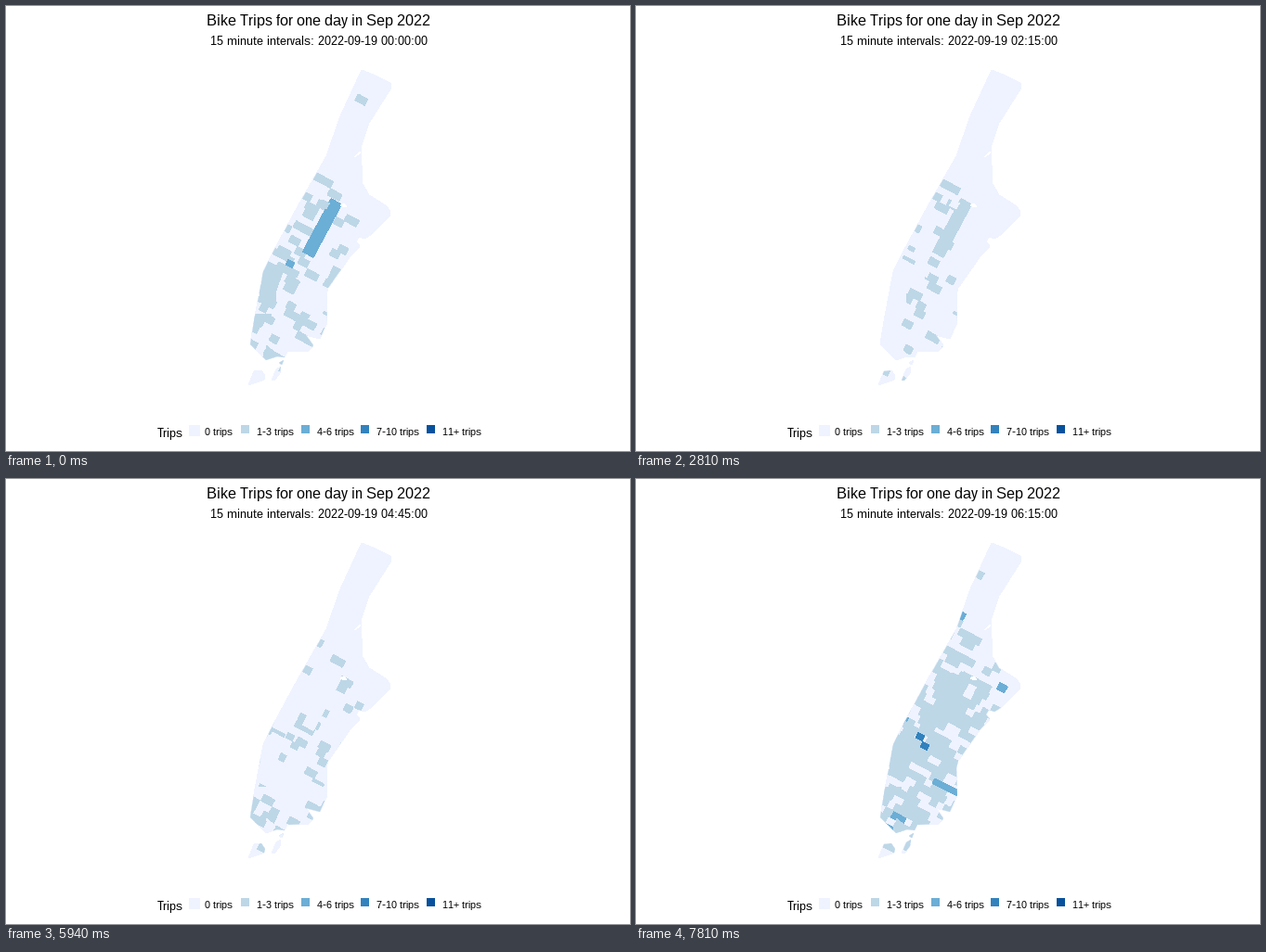
A matplotlib script that plays this animation: 672 by 480 pixels, repeating every 8 s.

```python
import random
from math import exp

import matplotlib.pyplot as plt
import numpy as np
from matplotlib.animation import FuncAnimation
from matplotlib.collections import PolyCollection
from matplotlib.path import Path

W, H, DPI = 672, 480, 100
INTERVAL, LOOP, STEP_MS, STEPS = 20, 8000, 312.5, 26
COLORS = ["#EFF3FF", "#BDD7E7", "#6BAED6", "#3182BD", "#08519C"]
THRESHOLDS = [1, 4, 7, 11]          # fewest trips for each darker colour

CENTER = np.array([340.5, 239.5])
ACROSS = np.array([0.882, 0.471])   # along a street
ALONG = np.array([0.471, -0.882])   # up an avenue

# Whole-pixel glyph spacing
plt.rcParams.update({"text.hinting": "native", "text.hinting_factor": 1,
                     "text.kerning_factor": 6})


def shape(*xy):
    return np.reshape(xy, (-1, 2)).astype(float)


def block(x, y, w, h):
    corners = [(-1, -1), (1, -1), (1, 1), (-1, 1)]
    return np.array([(x, y) + a * w / 2 * ACROSS + b * h / 2 * ALONG for a, b in corners])


ISLAND = shape(
    274, 376, 263, 365, 267, 340, 277, 287, 284, 272, 312, 220, 345, 162, 360, 119,
    383, 69, 400, 76, 414, 83, 415, 88, 391, 126, 382, 153, 384, 192, 391, 204, 410, 216,
    414, 222, 413, 227, 391, 248, 386, 251, 380, 249, 377, 254, 381, 259, 370, 271,
    347, 304, 345, 312, 346, 341, 338, 359, 323, 355, 331, 366, 326, 372, 303, 373,
    300, 379, 292, 378, 280, 382)
ISLET = shape(294, 385, 299, 382, 297, 387)
LAND = [ISLAND, ISLET, shape(291, 392, 296, 389, 295, 396, 289, 404, 286, 404),
        shape(267, 394, 275, 393, 279, 399, 278, 403, 261, 409)]
INLETS = [shape(360, 215, 363, 213, 367, 216, 365, 217),
          shape(375, 163, 382, 157, 382, 158)]

# Landmark tracts: outline, trips at midnight, trips in the morning
LANDMARKS = [
    (block(*CENTER, 13, 65), 4.5, 2),
    (shape(281, 275, 299, 284, 290, 309, 291, 320, 272, 320, 277, 287), 3.5, 1.1),
    (shape(268, 332, 286, 332, 286, 339, 267, 340), 2, 1.2),
    (shape(280, 366, 290, 374, 289, 377, 283, 375), 3.9, 1.5),
    (shape(322, 323, 346, 335, 346, 342, 319, 328), 0, 5),
    (block(297, 269, 27, 6), 3.9, 3),
    (block(343, 214, 8, 7), 3.9, 3),
    (block(306, 278, 8, 6), 4.2, 7.2),
    (block(311, 288, 8, 6), 3.9, 8.6),
    (ISLET, 3.9, 1.5),
]


def street_grid(rng):
    """Rows of tracts of uneven width, each with how busy its area is."""
    grid = []
    for up in range(-170, 190, 8):
        left = -60 + rng.uniform(0, 8)
        while left < 60:
            width = rng.uniform(7, 15)
            across = left + width / 2
            busy = 1 / (1 + exp((up + across / 2 - 40) / 12))
            grid.append((block(*(CENTER + across * ACROSS + up * ALONG), width, 7.5),
                         max(0.05, busy)))
            left += width
    return grid


GRID = street_grid(random.Random(4))


def tracts(step):
    """Outlines and colours of the tracts for one quarter of an hour."""
    rng = random.Random(step)
    night = exp(-step / 6)
    morning = 1 / (1 + exp(20.5 - step))
    chance = 0.04 + 0.25 * night + 0.6 * exp((step - 25) / 3.5)
    found = []
    for outline, busy in GRID:
        if rng.random() < busy * chance:
            level = 1 + (rng.random() < 0.05 * morning)
            found.append((outline, COLORS[level]))
    for outline, at_night, at_morning in LANDMARKS:
        trips = at_night * night + at_morning * morning
        found.append((outline, COLORS[sum(trips >= t for t in THRESHOLDS)]))
    return zip(*found)


SCENES = [tuple(tracts(s)) for s in range(STEPS)]

fig = plt.figure(figsize=(W / DPI, H / DPI), dpi=DPI, facecolor="white")
ax = fig.add_axes([0, 0, 1, 1])
ax.set(xlim=(0, W), ylim=(H, 0))
ax.axis("off")


def label(x, y, text, px, **kw):
    return ax.text(x, y, text, fontsize=px * 72 / DPI, family="Liberation Sans",
                   color="black", va="baseline", **kw)


def polygons(verts, colors):
    coll = PolyCollection(verts, facecolors=colors, edgecolors="none",
                          linewidths=0, antialiaseds=False)
    ax.add_collection(coll, autolim=False)
    return coll


label(336.5, 21, "Bike Trips for one day in Sep 2022", 16, ha="center")
subtitle = label(220, 42, "", 13)
label(163, 465, "Trips", 13)
LEGEND = [(197, 12, "0 trips"), (253, 9, "1-3 trips"), (318, 9, "4-6 trips"),
          (382, 9, "7-10 trips"), (453, 9, "11+ trips")]
for (x, size, text), color in zip(LEGEND, COLORS):
    polygons([shape(x, 452, x + size, 452, x + size, 452 + size, x, 452 + size)], [color])
    label(x + 17, 463, text, 11)

polygons(LAND, COLORS[:1])
active = polygons([], [])
active.set_clip_path(Path.make_compound_path(*(Path(np.vstack([p, p[:1]])) for p in LAND)),
                     ax.transData)
polygons(INLETS, ["white"])


def update(i):
    step = min(STEPS - 1, int((i * INTERVAL + 13) / STEP_MS))
    verts, colors = SCENES[step]
    active.set_verts(verts)
    active.set_facecolor(colors)
    hour, quarter = divmod(step, 4)
    subtitle.set_text(f"15 minute intervals: 2022-09-19 {hour:02d}:{quarter * 15:02d}:00")
    return active, subtitle


anim = FuncAnimation(fig, update, frames=LOOP // INTERVAL, interval=INTERVAL,
                     repeat=True, repeat_delay=0, blit=False)
plt.show()
```
